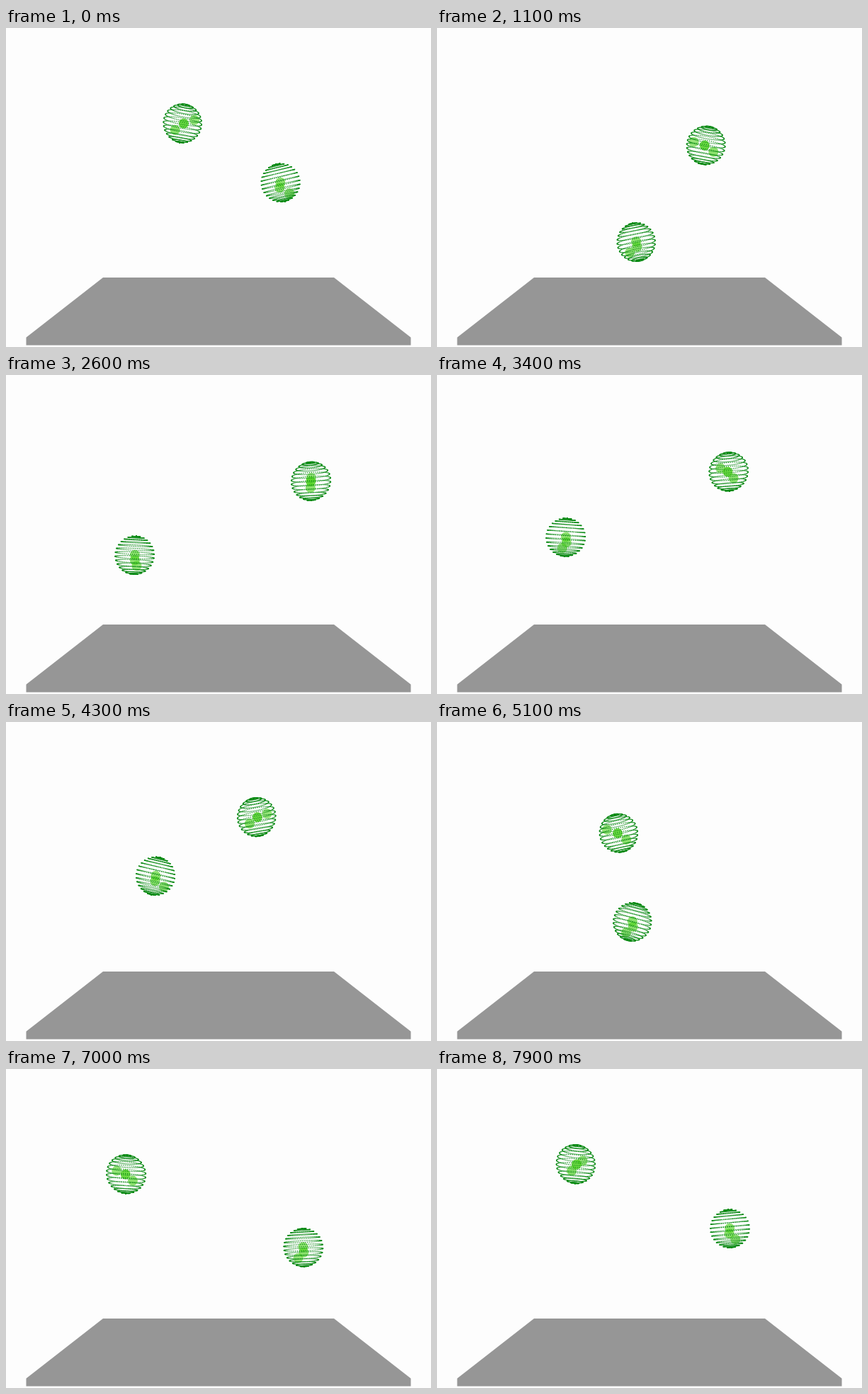
An HTML page with a canvas that plays this animation: 600x450 px, repeating every 8000 ms.

```html
<!DOCTYPE html>
<html lang="en">
<head>
<meta charset="utf-8">
<title>Two drifting spheres</title>
<style>
  html, body { margin: 0; width: 100%; height: 100%; overflow: hidden; background: #fdfdfd; }
  canvas { display: block; width: 600px; height: 450px; }
</style>
</head>
<body>
<canvas id="stage" width="600" height="450"></canvas>
<script>
const ctx = document.getElementById('stage').getContext('2d');
const LOOP = 8000, STEP = 100;
const ORBIT = 8.66, SPIN = 2.04;   // periods in seconds
const EYE_X = 300, EYE_Y = 226, FOCAL = 500;
const RADIUS = 27, LATS = 16, LONS = 60, DOT = 1.25;
const TURN = 2 * Math.PI;
const { sin, cos } = Math;

// The nth harmonic of an orbit at angle q
const wave = (q, n, a, b) => a * cos(n * q) + b * sin(n * q);

// Both paths are bent figures of eight: odd harmonics across, even ones down
const upperPose = q => ({
  x: EYE_X + wave(q, 1, -39.3, 132.4) + wave(q, 3, -9.2, 4.2) + wave(q, 5, -2.1, -1.4),
  y: 149.6 + wave(q, 2, -12.3, 13.3) + wave(q, 4, -2.5, -1),
  tilt: 10 * cos(q - 0.35) + 3 * cos(3 * q - 1.7)
});
const lowerPose = q => ({
  x: EYE_X + wave(q, 1, 80.7, -101.2) + wave(q, 3, 8, 7.7) + wave(q, 5, -1.3, 3.8),
  y: 255.1 + wave(q, 2, -23.5, 31.1) + wave(q, 4, -11.9, -0.5) + wave(q, 6, -1.5, -3.2),
  tilt: -12 * cos(q - 0.1) + 4.5 * cos(3 * q + 1.93)
});

function drawFloor() {
  ctx.fillStyle = '#969696';
  ctx.beginPath();
  [[137, 352], [463, 352], [571.5, 436.5], [571.5, 447.5], [28.5, 447.5], [28.5, 436.5]]
    .forEach(([x, y]) => ctx.lineTo(x, y));
  ctx.fill();
}

function drawSpot(x, y, alpha) {
  ctx.fillStyle = `rgba(80, 210, 32, ${alpha})`;
  ctx.beginPath();
  ctx.arc(x, y, 7, 0, TURN);
  ctx.fill();
}

// Rings of dots seen in perspective, front and back alike
function drawShell({ x: cx, y: cy, tilt }) {
  const angle = tilt * TURN / 360, s = sin(angle), c = cos(angle);
  ctx.fillStyle = '#0a8a14';
  for (let i = 0; i < LATS; i++) {
    const lat = Math.PI * i / (LATS - 1);
    const ring = RADIUS * sin(lat), h = -RADIUS * cos(lat);
    for (let j = 0; j < LONS; j++) {
      const lon = TURN * j / LONS;
      const x = ring * cos(lon), z = ring * sin(lon);
      const near = FOCAL / (FOCAL + z);
      const px = EYE_X + (cx - EYE_X + x * c - h * s) * near;
      const py = EYE_Y + (cy - EYE_Y + x * s + h * c) * near;
      ctx.fillRect(px - DOT / 2, py - DOT / 2, DOT, DOT);
    }
  }
}

function draw(ms) {
  const q = TURN * ms / 1000 / ORBIT;
  const swing = cos(TURN * (ms / 1000 / SPIN - 0.03));
  const up = upperPose(q), low = lowerPose(q);

  ctx.fillStyle = '#fdfdfd';
  ctx.fillRect(0, 0, 600, 450);
  drawFloor();

  drawSpot(up.x + 17 * swing, up.y - 5, 0.6);
  drawSpot(up.x - 11 * swing, up.y + 9, 0.65);
  drawSpot(up.x + 1.5 * swing, up.y, 0.85);
  drawShell(up);

  drawSpot(low.x + 2 + 11 * swing, low.y + 15, 0.6);
  drawSpot(low.x - swing, low.y + 7, 0.65);
  drawSpot(low.x, low.y - 0.5, 0.65);
  drawShell(low);
}

const start = performance.now();
function tick() {
  const ms = Math.max(0, performance.now() - start) % LOOP;
  draw(Math.floor(ms / STEP) * STEP);
  requestAnimationFrame(tick);
}
tick();
</script>
</body>
</html>
```
